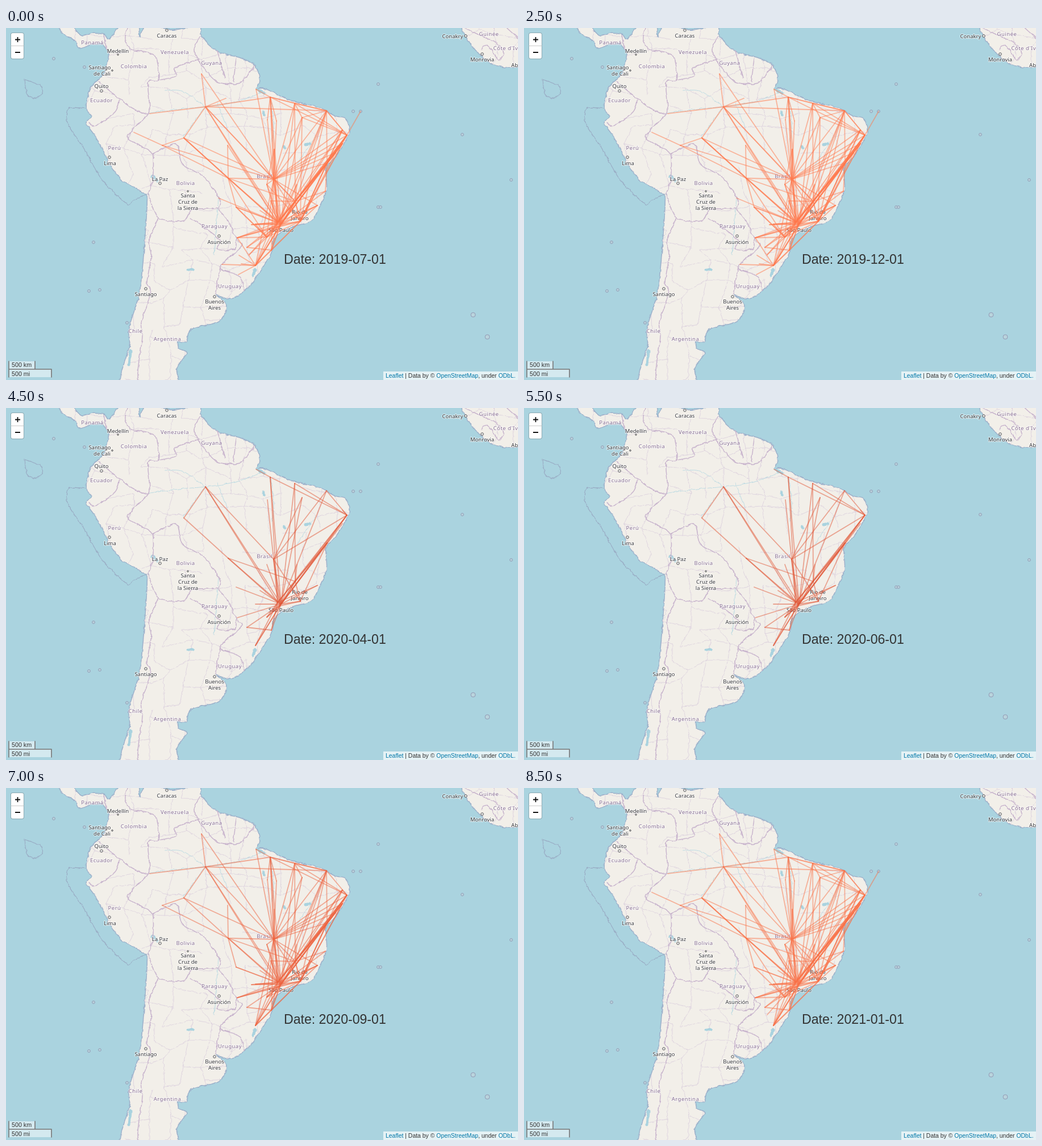
An HTML page for the animation above (9 s loop, 901 by 621 pixels).

```html
<!DOCTYPE html>
<html lang="en">
<head>
<meta charset="utf-8">
<title>Flight routes by month</title>
<style>
html, body { margin: 0; height: 100%; overflow: hidden; background: #aad3df; }
svg { display: block; width: 100%; height: 100%; }
path, line { fill: none; stroke-linejoin: round; stroke-linecap: round; }
.land { fill: #f2efe9; stroke: #9db0ca; stroke-width: 3; paint-order: stroke; }
.country { stroke: #c8b4cd; stroke-width: 1.5; }
.state { stroke: #ddd2de; stroke-width: .9; }
.sea { stroke: #98a9c2; stroke-width: 1.1; }
.river { stroke: #bcdbe3; stroke-width: 1; }
.islet { fill: #b9d3dc; stroke: #929bb5; }
.dot { fill: #eee; stroke: #555; }
.label { font: 9.5px "Noto Sans", sans-serif; text-anchor: middle; fill: #38383c;
  stroke: #ffffffa0; stroke-width: 2px; paint-order: stroke; }
.nation { fill: #866d91; letter-spacing: .5px; }
.ui { font-family: "Liberation Sans", Arial, sans-serif; fill: #333; }
.link { fill: #0078a8; }
</style>
</head>
<body>
<svg viewBox="0 0 901 621">
  <filter id="rough" filterUnits="userSpaceOnUse" x="-20" y="-20" width="941" height="661" color-interpolation-filters="sRGB">
    <feTurbulence type="fractalNoise" baseFrequency=".12" numOctaves="2" seed="4"/>
    <feDisplacementMap in="SourceGraphic" scale="5" xChannelSelector="R" yChannelSelector="G"/>
  </filter>
  <rect width="901" height="621" fill="#aad3df"/>
  <g id="map" filter="url(#rough)"></g>
  <g id="labels"></g>
  <g id="routes" stroke-width="1.8" stroke-opacity=".5"></g>
  <g class="ui">
    <text id="date" x="489" y="416" font-size="23.1"></text>
    <rect x="8" y="8" width="24" height="47" rx="4" opacity=".25"/>
    <rect x="9" y="9" width="22" height="45" rx="3" fill="#fff"/>
    <path d="M9 31.5H31" stroke="#ccc"/>
    <path d="M16 20.5H25M20.5 16V25M16 43H25" stroke="#111" stroke-width="1.8" style="stroke-linecap:butt"/>
    <path d="M5 588H51V602H80V616H5Z" style="fill:#ffffff80"/>
    <path d="M5 588V616M5 602H80V616M51 588V602" stroke="#777" stroke-width="1.6"/>
    <text x="10" y="598" font-size="10.7">500 km</text>
    <text x="10" y="614" font-size="10.7">500 mi</text>
    <rect x="664" y="606" width="237" height="15" fill="#fff" opacity=".7"/>
    <text x="668" y="617" font-size="10.45"><tspan class="link">Leaflet</tspan> | Data by © <tspan class="link">OpenStreetMap</tspan>, under <tspan class="link">ODbL.</tspan></text>
  </g>
</svg>
<script>
const $ = id => document.getElementById(id);
const path = (kind, d) => `<path class="${kind}" d="${d}"/>`;
const noise = n => { const s = Math.sin(n * 127.1) * 43758.5453; return s - Math.floor(s); };

// Curves through key points (Catmull-Rom); "/" separates strokes
function curve(strokes) {
  return strokes.split('/').map(stroke => {
    const pts = stroke.trim().split(/,\s*/).map(p => p.split(' ').map(Number));
    const at = i => pts[Math.max(0, Math.min(pts.length - 1, i))];
    const handle = (i, side) => at(i).map((v, k) => (v + side * (at(i + 1)[k] - at(i - 1)[k]) / 7).toFixed(1));
    return 'M' + pts[0] + pts.slice(1).map((p, i) => `C${handle(i, 1)} ${handle(i + 1, -1)} ${p}`).join('');
  }).join('');
}

const land = curve(`112 -10, 132 14, 152 10, 172 12, 182 20, 206 -10, 230 -10, 235 18, 242 0, 256 -6, 290 4, 338 -2, 343 12, 357 31,
  381 46, 411 53, 437 66, 446 92, 441 106, 456 108, 482 120, 508 131, 548 140, 580 156, 597 160, 603 186, 583 222, 563 246, 563 287, 543 331, 533 342, 497 352, 470 372,
  468 393, 447 428, 428 455, 398 477, 369 471, 387 488, 375 517, 326 530, 318 552, 302 553, 303 566, 318 574, 300 600, 298 640,
  203 640, 218 560, 217 530, 235 470, 243 400, 249 310, 244 292, 205 268, 183 240, 160 194, 142 168, 151 157, 142 137, 151 104, 173 80, 181 47, 169 28, 149 29, 129 36, 122 22, 100 9, 90 -10
  / 797 -10, 808 12, 828 40, 855 62, 884 69, 910 60, 910 -10`);

const borders = curve(`172 13, 177 38 / 214 -5, 210 20, 222 38, 262 48, 268 92, 250 96, 252 150, 222 141, 200 125, 162 94
  / 200 125, 192 148, 158 172, 147 168 / 268 92, 300 85, 297 70, 340 55 / 342 14, 331 40, 348 70, 372 95, 411 97, 438 67 / 372 40, 385 88 / 405 54, 400 95
  / 252 150, 222 180, 215 195, 240 210, 258 222, 258 270, 250 292 / 258 222, 300 205, 310 240, 348 262, 375 300, 372 318, 328 320, 313 340, 268 335, 250 292
  / 325 335, 375 372, 371 390, 402 390, 405 372 / 372 318, 392 342, 405 372, 415 385, 377 422, 410 437, 420 462 / 377 422, 368 470
  / 268 335, 252 375, 256 400, 248 450, 255 465, 238 520, 240 545, 232 605, 235 640 / 809 0, 836 14, 860 24, 876 44, 868 58 / 836 38, 846 30, 868 58 / 876 -5, 901 18`);

const maritime = curve(`142 142, 110 142, 109 170, 135 209, 165 262, 190 290, 215 311, 224 304, 250 293 / 33 91, 60 101, 64 113, 52 124, 37 117, 33 91`);
const rivers = curve(`253 150, 304 143, 351 139, 392 133, 430 122, 448 114 / 351 139, 312 112, 280 110 / 351 139, 312 192 / 372 132, 390 180 / 465 122, 472 170, 468 200 / 545 192, 512 240 / 374 300, 366 400`);
const lakes = curve(`258 261, 266 270 / 321 426, 329 427 / 438 426, 435 437 / 527 206, 535 204 / 490 210, 491 212 / 453 149, 455 153 / 441 107, 455 115 / 219 570, 217 595`);

// Provinces: a jittered lattice with some edges left out
const cell = 34;
const corner = (i, j) => [i, j].map((v, k) => Math.round((v + .7 * noise(i * 31 + j * 7 + k)) * cell));
let provinces = '';
for (let i = 3; i < 27; i++) for (let j = -1; j < 19; j++) {
  if (noise(i * 5 + j * 13) > .35) provinces += `M${corner(i, j)}L${corner(i + 1, j)}`;
  if (noise(i * 17 + j * 3) > .35) provinces += `M${corner(i, j)}L${corner(i, j + 1)}`;
}

const points = list => list.split(',').map(s => s.trim().split(' '));
const circles = (kind, r, list) => points(list).map(([x, y]) => `<circle class="${kind}" cx="${x}" cy="${y}" r="${r}"/>`).join('');

$('map').innerHTML = `<clipPath id="shore"><path d="${land}"/></clipPath>`
  + path('land', land) + `<g clip-path="url(#shore)">${path('state', provinces)}</g>`
  + path('river', rivers) + `<g stroke="#aad3df" stroke-width="5"><path d="${lakes}"/></g>`
  + path('country', borders) + path('sea', maritime);

const labels = (kind, list) => list.split(',').map(s => {
  const [name, x, y] = s.trim().split('|');
  return `<text class="label ${kind}" x="${x}" y="${+y + 3.5}">${name}</text>`;
}).join('');

$('labels').innerHTML =
  circles('islet', 2.4, '84 54, 138 69, 655 99, 611 147, 624 147, 803 188, 889 268, 655 316, 659 316, 154 378, 146 464, 165 462, 213 520')
  + circles('islet', 4, '822 506, 847 545')
  + circles('dot', 2.3, '168 111, 182 228, 271 274, 246 460, 367 474, 375 367, 283 4, 809 14, 838 46')
  + circles('dot', 1.3, '197 47, 187 75, 320 288')
  + labels('nation', `Panamá|152|25, Colombia|225|67, Venezuela|297|42, Guyana|362|61, Ecuador|168|127, Perú|191|211, Bolivia|316|273,
    Brasil|455|261, Paraguay|367|349, Uruguay|394|455, Chile|228|534, Argentina|284|548, Guinée|850|10, Côte d'Ivoire|889|35`)
  + labels('', `Caracas|283|13, Medellín|197|40, Santiago|165|69, de Cali|169|80, Quito|168|102, Lima|183|238, La Paz|271|266,
    Santa|320|295, Cruz de|320|306, la Sierra|320|317, Asunción|375|377, Santiago|246|469, Buenos|367|482, Aires|367|493,
    São Paulo|484|356, Rio de|517|324, Janeiro|517|335, Conakry|786|14, Monrovia|838|55, Abidjan|906|65`);

const airports = Object.fromEntries(points(`MAO 351 139, BEL 465 122, SLZ 508 133, FOR 564 146, NAT 592 180, REC 600 189, FEN 624 147, MCZ 592 204,
  AJU 580 220, SSA 565 238, BSB 471 267, GYN 459 276, CGB 391 265, CGR 405 316, PVH 313 194, RBR 275 207, CZS 225 184, TBT 253 151, BVB 344 81,
  MCP 440 108, THE 521 158, CNF 509 306, VIX 548 313, GIG 518 341, GRU 484 346, CGH 482 349, VCP 478 343, CWB 459 369, FLN 467 392, POA 439 419,
  IGU 407 370, LDB 439 346, PPB 432 347, PIN 387 124, AFL 390 207, CMG 374 300, URG 380 417, RIA 414 416, SRA 410 401, BGX 409 435, PFB 428 400,
  XAP 424 387, BPS 562 288, UDI 466 305, SJP 447 322, MOC 512 276, IMP 476 164, MAB 460 162, PMW 472 214`)
  .map(([code, ...place]) => [code, place]));

// Each row: hubs followed by their destinations
const network = [
  { demand: 0, hubs: `GRU MAO CGB BEL SLZ THE FOR REC SSA BSB GYN CNF VIX GIG CGR LDB IGU CWB XAP FLN POA MCZ SJP,
    VCP MAO REC SSA BSB CNF VIX FLN POA CGB CWB BEL, CGH GIG BSB POA CWB SSA CNF, BSB MAO THE FOR REC GIG MAB,
    REC BEL FOR SLZ SSA CNF NAT, CNF CGB SSA MOC SLZ GIG, PVH MAO CGB, BEL MCP, SSA GIG, XAP FLN` },
  { demand: .2, hubs: `BSB BEL SLZ SSA CGB CNF VIX POA CWB NAT MCZ GYN MCP PVH IMP PMW AJU FLN BVB, GRU NAT AJU BPS UDI PPB,
    GIG REC FOR POA CWB FLN VIX CNF SSA NAT MCZ IGU, CGB CGR AFL RBR, FOR SSA SLZ BEL, CGH VIX FLN IGU, MAO BVB TBT BEL FOR,
    BEL SLZ IMP MAB, SLZ THE, CNF REC FOR BPS UDI MCZ, VCP UDI PPB LDB IGU GYN CGR FOR NAT MCZ, SSA AJU MCZ REC, POA FLN CWB, RBR PVH` },
  { demand: .6, hubs: `VCP AFL PVH PMW MOC XAP AJU PFB, CGB PVH CWB, GIG THE GYN AJU, REC THE AJU FEN, SSA BPS NAT,
    CNF CWB POA, FOR THE NAT, CWB LDB IGU CGR, RBR BSB CZS` },
  { demand: 1, hubs: `VCP CMG, CGR CWB, CWB PFB, POA IGU URG RIA SRA BGX, MAO PIN CNF, GYN PMW` },
];
const routes = network.flatMap(({ demand, hubs }) => points(hubs.replace(/\s+/g, ' ')).flatMap(([hub, ...ends]) =>
  ends.map(end => ({ demand, from: airports[hub], to: airports[end] }))));

// Full service, a collapse in spring 2020, then a steady recovery
const demandAt = step => step < 8 ? 1 : step === 8 ? .6 : Math.max(0, .14 * (step - 11));

function draw(step) {
  const month = 6 + step + (step > 16);
  $('date').textContent = `Date: ${2019 + Math.floor(month / 12)}-${String(month % 12 + 1).padStart(2, '0')}-01`;

  const demand = demandAt(step);
  const shade = (calm, busy) => Math.round(calm + (busy - calm) * demand);
  $('routes').setAttribute('stroke', `rgb(${shade(225, 255)},${shade(88, 120)},${shade(56, 76)})`);
  $('routes').innerHTML = routes.filter(route => route.demand <= demand)
    .map(({ from: [x1, y1], to: [x2, y2] }) => `<line x1="${x1}" y1="${y1}" x2="${x2}" y2="${y2}"/>`).join('');
}

let shown = -1;
function tick() {
  const step = Math.floor(performance.now() % 9000 / 500);
  if (step !== shown) draw(shown = step);
  requestAnimationFrame(tick);
}
tick();
</script>
</body>
</html>
```
